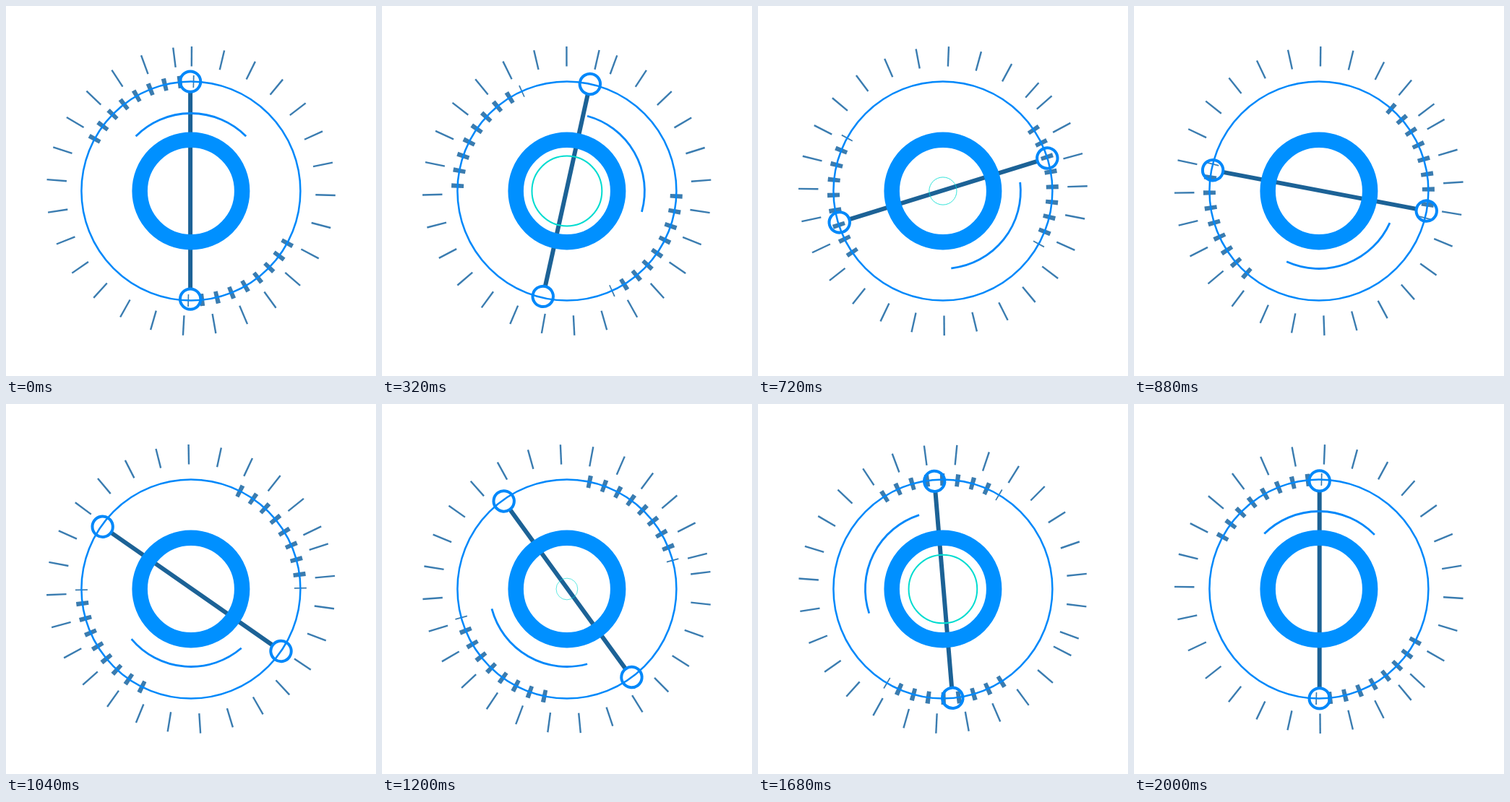
Write an HTML page with a canvas that moves like this. It is 512 px wide and 512 px high and loops after 2.04 s.

```html
<!DOCTYPE html>
<html lang="en">
<head>
<meta charset="utf-8">
<title>Dial loop</title>
<style>
  html, body { margin: 0; width: 100%; height: 100%; overflow: hidden; background: #fff; }
  canvas { display: block; width: 512px; height: 512px; }
</style>
</head>
<body>
<canvas id="stage" width="512" height="512"></canvas>
<script>
const ctx = document.getElementById('stage').getContext('2d');
const LOOP = 2040, STEP = 40, LAST = 49;
const BLUE = '#0090ff', LINE = '#0088fa', STEEL = '#3a7cb0', BAR = '#1c6296', TEAL = '#00dcd0';
const rad = deg => deg * Math.PI / 180;

// Angle of the sweeping arc: [step, degrees]
const SWEEP = [[0, 0], [7, 60.4], [13, 98], [21, 159.4], [29, 210], [41, 297], [49, 360.5]];

function track(keys, n) {
  const i = Math.max(1, keys.findIndex(k => k[0] >= n));
  const [a, va] = keys[i - 1], [b, vb] = keys[i];
  return va + (vb - va) * (n - a) / (b - a);
}

// Cubic ease with control points (.333, 0) and (.39, 1)
function ease(x) {
  let lo = 0, hi = 1, s;
  for (let i = 0; i < 24; i++) {
    s = (lo + hi) / 2;
    const r = 1 - s;
    if (3 * r * r * s * .333 + 3 * r * s * s * .39 + s ** 3 < x) lo = s; else hi = s;
  }
  return s * s * (3 - 2 * s);
}

function stroke(color, width) {
  ctx.strokeStyle = color;
  ctx.lineWidth = width;
  ctx.stroke();
}

// Angles in degrees, clockwise from the top
function arc(r, color, width, from = 0, to = 360, x = 0, y = 0) {
  ctx.beginPath();
  ctx.arc(x, y, r, rad(from - 90), rad(to - 90));
  stroke(color, width);
}

function line(y1, y2, color, width) {
  ctx.beginPath();
  ctx.moveTo(0, y1);
  ctx.lineTo(0, y2);
  stroke(color, width);
}

function turned(deg, draw) {
  ctx.save();
  ctx.rotate(rad(deg));
  draw();
  ctx.restore();
}

function drawTicks(n) {
  for (let i = 0; i < 28; i++) {
    turned(.3 + n * 140 / LAST + i * 13.06, () => line(-200, -172.5, STEEL, 2.4));
  }
}

function drawDashes(n) {
  ctx.setLineDash([6, 15.05]);
  for (const side of [0, 180]) {
    turned(side - n * 180 / LAST, () => arc(151.5, STEEL, 17, -62.7, 1.7));
  }
  ctx.setLineDash([]);
}

function drawBar(n) {
  turned(180 * ease(n / LAST), () => {
    ctx.translate(-.8, -.9);
    line(-135, 135, BAR, 6);
    for (const y of [-150.5, 150.5]) arc(14.2, LINE, 4, 0, 360, 0, y);
  });
}

function drawPulse(n) {
  const r = 69 * Math.abs(n - 23.5) / (n < 23.5 ? 23.5 : 25.5);
  if (r > 10) arc(r, TEAL, r * .042);
}

function frame(now) {
  const n = Math.max(0, Math.floor(now % LOOP / STEP) - 1);
  ctx.setTransform(1, 0, 0, 1, 0, 0);
  ctx.fillStyle = '#fff';
  ctx.fillRect(0, 0, 512, 512);
  ctx.translate(255.9, 256);
  drawTicks(n);
  drawDashes(n);
  arc(151.5, LINE, 2.5);
  drawBar(n);
  drawPulse(n);
  const a = track(SWEEP, n);
  arc(107.5, LINE, 2.8, a - 45.2, a + 45.2);
  arc(70.75, BLUE, 21.5);
}

let start;
function loop(now) {
  start ??= now;
  frame(now - start);
  requestAnimationFrame(loop);
}
frame(0);
requestAnimationFrame(loop);
</script>
</body>
</html>
```
